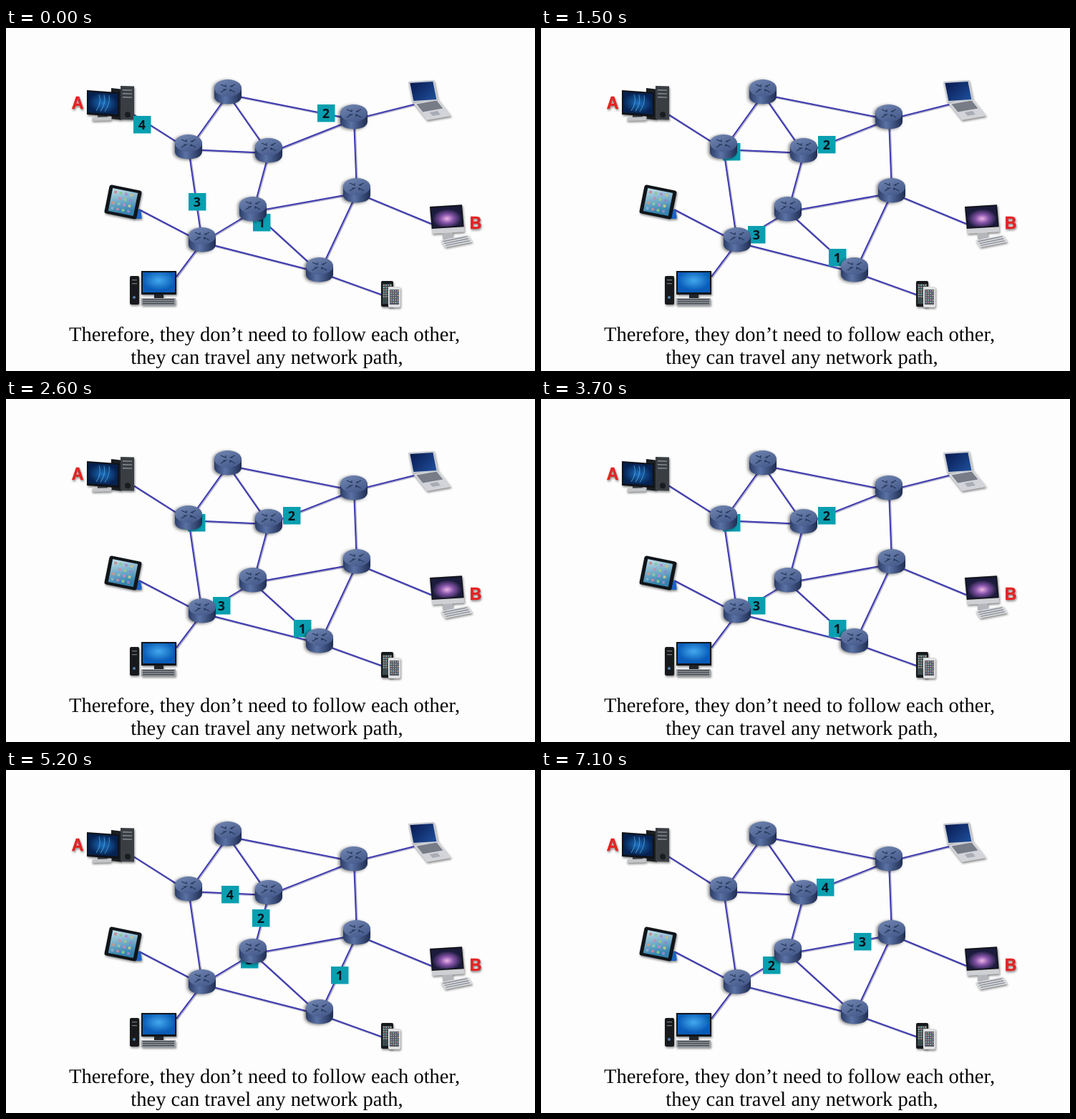
Animation, 739 px wide and 480 px high, one loop 7.2 s. Source, as an HTML page:

```html
<!DOCTYPE html>
<html lang="en">
<head>
<meta charset="utf-8">
<title>Packets on network paths</title>
<style>
html, body { margin: 0; width: 100%; height: 100%; overflow: hidden; background: #fdfdfd; }
svg { display: block; width: 739px; height: 480px; }
.caption { font: 28.55px "Liberation Serif", "Times New Roman", serif; text-anchor: middle; text-rendering: geometricPrecision; fill: #080808; }
.mark { font: bold 23px "Liberation Sans", Arial, sans-serif; text-anchor: middle; fill: #e32322; stroke: #e32322; stroke-width: .6; }
#packets text { font: bold 18px "Open Sans", Arial, sans-serif; text-anchor: middle; fill: #06141c; }
#links { fill: none; }
#devices g, .mark { filter: drop-shadow(1px 2px 1.5px rgba(0, 0, 0, .45)); }
#routers { filter: drop-shadow(-1.5px 1.5px 2px rgba(0, 0, 0, .5)); }
</style>
</head>
<body>
<svg viewBox="0 0 739 480">
  <defs>
    <linearGradient id="side">
      <stop offset="0" stop-color="#2c3d68"/><stop offset=".4" stop-color="#5a72a5"/>
      <stop offset="1" stop-color="#1f2d52"/>
    </linearGradient>
    <linearGradient id="top" x2=".7" y2="1">
      <stop offset="0" stop-color="#7287b2"/><stop offset="1" stop-color="#465b8c"/>
    </linearGradient>
    <radialGradient id="glow" cy=".4">
      <stop offset="0" stop-color="#43a9ee"/><stop offset="1" stop-color="#0a5cb8"/>
    </radialGradient>
    <radialGradient id="deep">
      <stop offset="0" stop-color="#1c6fc0"/><stop offset="1" stop-color="#06214f"/>
    </radialGradient>
    <radialGradient id="aurora" cy=".6">
      <stop offset="0" stop-color="#f0b4e8"/><stop offset=".45" stop-color="#8554a8"/>
      <stop offset="1" stop-color="#1b1b3c"/>
    </radialGradient>
    <linearGradient id="navy" x2="1" y2="1">
      <stop offset="0" stop-color="#081a50"/><stop offset="1" stop-color="#1f4f9c"/>
    </linearGradient>
    <linearGradient id="sky" x2=".4" y2="1">
      <stop offset="0" stop-color="#c3dfea"/><stop offset="1" stop-color="#3583b0"/>
    </linearGradient>
    <g id="router">
      <path d="M-19-6V6C-19 20 19 20 19 6V-6Z" fill="url(#side)"/>
      <ellipse cy="-6" rx="19" ry="12" fill="url(#top)"/>
      <path d="M-10-11l7 3v-3M10-11l-7 3h4M-10 0l7-4h-4M10 0l-7-4v3" fill="none" stroke="#263758" stroke-width="1.2"/>
    </g>
  </defs>
  <g id="links"></g>
  <g id="devices"></g>
  <g class="mark"><text x="100" y="113">A</text><text x="656" y="281">B</text></g>
  <g id="packets"></g>
  <g id="routers"></g>
  <text class="caption" x="361" y="438">Therefore, they don’t need to follow each other,</text>
  <text class="caption" x="364.5" y="470">they can travel any network path,</text>
</svg>
<script>
const LOOP = 7200, STEP = 100;
const $ = id => document.getElementById(id);

function add(parent, tag, attrs = {}) {
  const el = document.createElementNS('http://www.w3.org/2000/svg', tag);
  for (const key in attrs) el.setAttribute(key, attrs[key]);
  return parent.appendChild(el);
}

// Network: routers, the pairs they link, and the cables to the devices.
const routers = [[310, 90], [255, 167], [367, 172], [486, 125], [490, 228], [345, 254], [274, 297], [438, 339]];
const pairs = '01 02 03 12 23 34 25 16 54 57 47 65 67'.split(' ');
const cables = [[1, 178, 121], [3, 570, 107], [4, 594, 274], [7, 524, 373], [6, 186, 254], [6, 238, 348]];
const joint = i => [routers[i][0], routers[i][1] + 3];

const wires = pairs.map(([a, b]) => `M${joint(a)}L${joint(b)}`)
  .concat(cables.map(([i, x, y]) => `M${joint(i)}L${x} ${y}`)).join('');
add($('links'), 'path', { d: wires, stroke: '#b3b2cb', 'stroke-width': 3, transform: 'translate(1 .8)' });
add($('links'), 'path', { d: wires, stroke: '#3f3bb0', 'stroke-width': 2 });
routers.forEach(([x, y]) => add($('routers'), 'use', { href: '#router', x, y }));

// Devices are built from slanted panels; rise and lean are the slopes of their edges.
const device = () => add($('devices'), 'g');

function panel(parent, x, y, width, height, fill, rise = 0, lean = 0, rx = 0) {
  const g = add(parent, 'svg:g'.slice(4), { transform: `matrix(1 ${rise} ${lean} 1 ${x} ${y})`, style: 'filter:none' });
  add(g, 'rect', { width, height, fill, rx });
  return g;
}

function inset(face, x, y, width, height, fill) {
  return add(face, 'rect', { x, y, width, height, fill });
}

function rows(face, count, x, y, width, gap, color) {
  for (let i = 0; i < count; i++) inset(face, x, y + i * gap, width, 1.3, color);
}

function icons(face, cols, lines, x, y, gap, size) {
  for (let i = 0; i < cols * lines; i++) {
    inset(face, x + i % cols * gap, y + Math.floor(i / cols) * gap, size, size, `hsl(${i * 137 % 360} 35% 66%)`);
  }
}

function desktop() {
  const g = device();
  panel(g, 147, 84, 15, 43, '#1b1e21', .12);
  const front = panel(g, 160, 81, 19, 47, '#3a3e43', .03);
  rows(front, 3, 3, 5, 13, 5, '#8d9298');
  add(front, 'circle', { cx: 10, cy: 40, r: 4, fill: '#1a1d20' });
  panel(g, 128, 119, 14, 8, '#383c40');
  panel(g, 121, 125, 27, 5, '#c3c5c7', -.03, -.3);
  const screen = panel(g, 113, 87, 45, 34, '#101216', .07);
  inset(screen, 2, 2, 41, 29, 'url(#deep)');
  for (let i = 0; i < 3; i++) {
    add(screen, 'path', { d: `M${13 + i * 6} 28q8-12 ${4 + i}-23`, fill: 'none', stroke: '#65c3ec', 'stroke-opacity': .6 });
  }
}

function laptop() {
  const g = device();
  const base = panel(g, 569, 105, 34, 24, '#d2d4d9', -.18, .79);
  inset(base, 3, 2, 28, 11, '#777c87');
  inset(base, 11, 15, 11, 5, '#a9acb5');
  const lid = panel(g, 562, 75, 36, 29, '#c8cbd2', -.06, .2);
  inset(lid, 2, 2, 32, 25, 'url(#navy)');
}

function tablet() {
  const g = device();
  panel(g, 178, 254, 10, 13, '#1c62c4', 0, .15, 2);
  const body = panel(g, 145, 219, 45, 40, '#111519', .2, -.2, 3);
  inset(body, 5, 4, 35, 32, 'url(#sky)');
  icons(body, 4, 4, 8, 7, 7.5, 3.5);
}

function tower() {
  const g = device();
  const box = panel(g, 173, 347, 13, 40, '#17191c', 0, 0, 2);
  rows(box, 2, 3, 5, 7, 5, '#70757a');
  add(box, 'circle', { cx: 6, cy: 30, r: 2, fill: '#4e7fae' });
  panel(g, 207, 370, 13, 9, '#22262b');
  const keys = panel(g, 189, 378, 48, 10, '#9ba0a5');
  rows(keys, 3, 2, 1.5, 44, 2.8, '#34393f');
  const screen = panel(g, 189, 340, 49, 33, '#111519');
  inset(screen, 2, 2, 45, 28, 'url(#glow)');
}

function allInOne() {
  const g = device();
  panel(g, 610, 284, 14, 11, '#b4b6bb');
  const body = panel(g, 592, 250, 45, 38, '#cfd0d4', -.06, .09);
  inset(body, 0, 0, 45, 31, '#14151d');
  inset(body, 2, 2, 41, 27, 'url(#aurora)');
  const keys = panel(g, 607, 297, 38, 10, '#dadce0', -.2, .65);
  rows(keys, 3, 2, 1.5, 34, 2.8, '#8b8e95');
}

function phone(x, y, height, shell, glass) {
  const body = panel(device(), x, y, 17, height, shell, 0, 0, 2);
  inset(body, 2, 4, 13, height - 8, glass);
  icons(body, 4, 6, 3, 5, 3.2, 1.8);
}

desktop();
laptop();
tablet();
tower();
allInOne();
phone(524, 354, 36, '#16191c', '#3b4a4c');
phone(534, 362, 29, '#dfdfe0', '#515763');

// A route lists the places reached at each key time; a plain number is a router passed on the way.
const times = [0, 1000, 4500, 5200, 6200];
const routes = [
  [[357, 272], [414, 321], 7, [466, 287], [490, 228]],
  [[447, 119], 3, [399, 163], 2, [356, 207], 5, [322, 273]],
  [[267, 243], 6, [301, 289], [340, 265], 5, [449, 240]],
  [[190, 135], [266, 173], [313, 174], 2, [397, 164]]
];

function splitLegs(route) {
  const legs = [];
  let leg = [];
  for (const stop of route) {
    leg.push(Array.isArray(stop) ? stop : joint(stop));
    if (Array.isArray(stop)) {
      if (leg.length > 1) legs.push(leg);
      leg = [stop];
    }
  }
  const [first, ...rest] = legs;
  const pause = [rest[0][0], rest[0][0]];
  return [first, pause, ...rest];
}

const packets = routes.map((route, i) => {
  const el = add($('packets'), 'g');
  add(el, 'rect', { x: -12, y: -12, width: 24.5, height: 24.5, fill: '#099fb0' });
  add(el, 'text', { y: 6.5 }).textContent = i + 1;
  return { el, legs: splitLegs(route) };
});

function along(points, k) {
  const sizes = points.slice(1).map((p, i) => Math.hypot(p[0] - points[i][0], p[1] - points[i][1]));
  let left = k * sizes.reduce((a, b) => a + b), i = 0;
  while (i < sizes.length - 1 && left > sizes[i]) left -= sizes[i++];
  const f = left / (sizes[i] || 1);
  return points[i].map((v, j) => v + (points[i + 1][j] - v) * f);
}

function draw(now) {
  const t = Math.floor(now % LOOP / STEP) * STEP;
  const n = Math.min(times.filter(at => at <= t).length, times.length - 1) - 1;
  const k = Math.min(1, (t - times[n]) / (times[n + 1] - times[n]));
  for (const { el, legs } of packets) {
    el.setAttribute('transform', `translate(${along(legs[n], k)})`);
  }
}

const begin = performance.now();
function tick() {
  draw(performance.now() - begin);
  requestAnimationFrame(tick);
}
tick();
</script>
</body>
</html>
```
